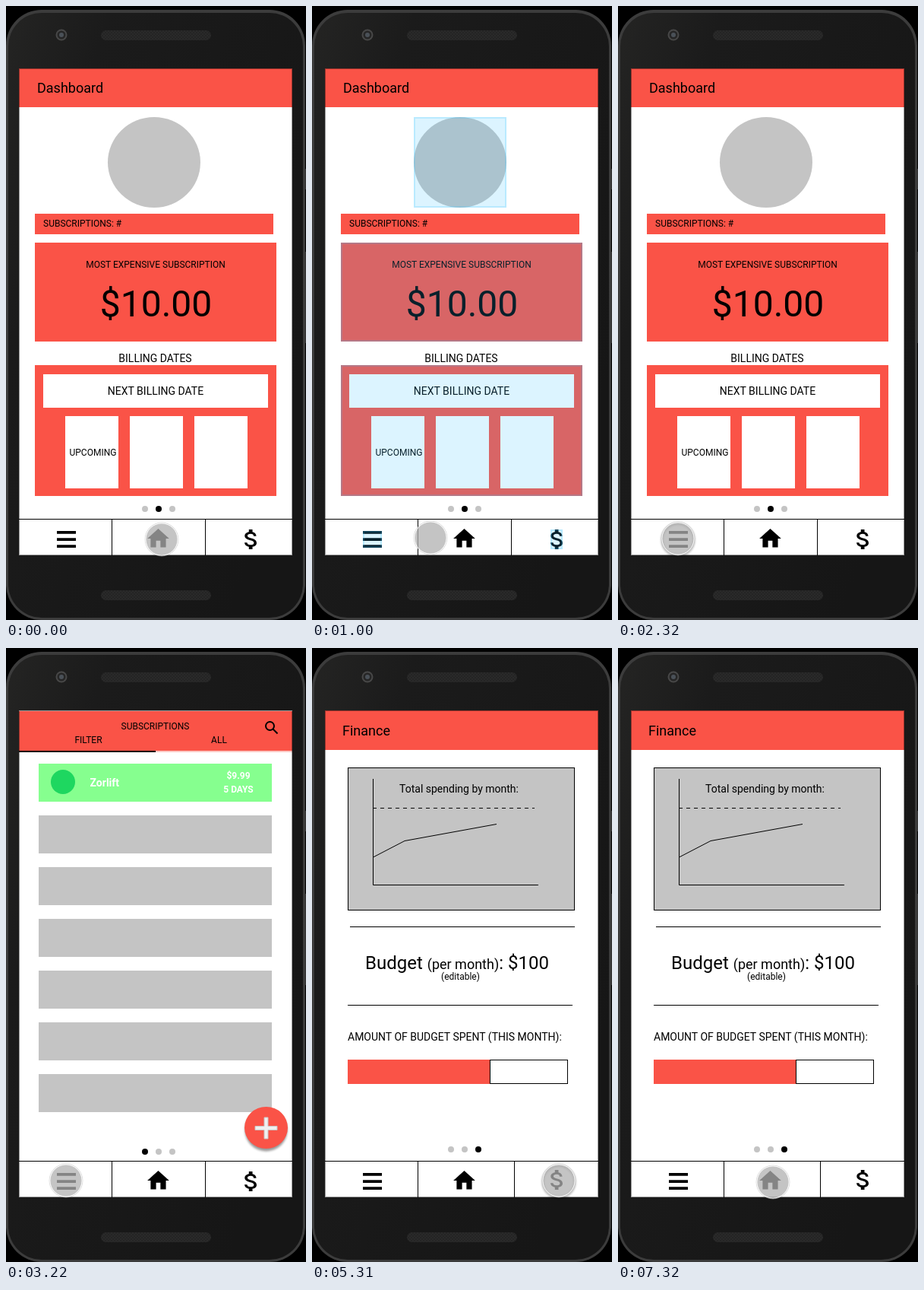
Recreate the animation shown at these times as an HTML page. Size 395x807 px, loop 8 s.

```html
<!DOCTYPE html>
<html lang="en">
<head>
<meta charset="utf-8">
<title>Phone prototype</title>
<style>
html, body { margin: 0; width: 100%; height: 100%; overflow: hidden; background: #000; }
svg { display: block; width: 395px; height: 807px; font: 12px Roboto, sans-serif; }
.red { fill: #fa5347; }
.gray { fill: #c4c4c4; }
.white { fill: #fff; }
.line { fill: none; stroke: #000; }
.mid { text-anchor: middle; }
.t14 { font-size: 14px; }
.t18 { font-size: 18px; }
.t24 { font-size: 24px; }
.bold { font-weight: 700; fill: #fff; }
#hints rect { fill: #32c1ff; fill-opacity: .35; }
#hints path { fill: none; stroke: #32c1ff; stroke-opacity: .55; stroke-width: 2; }
</style>
</head>
<body>
<svg viewBox="0 0 395 807">
  <defs>
    <linearGradient id="body" x2="1" y2=".6">
      <stop offset="0" stop-color="#242423"/><stop offset=".25" stop-color="#1b1b1b"/>
      <stop offset="1" stop-color="#161616"/>
    </linearGradient>
    <pattern id="mesh" width="4" height="4" patternUnits="userSpaceOnUse">
      <rect width="4" height="4" fill="#2a2a2a"/>
      <circle cx="1" cy="1" r=".8" fill="#1c1c1c"/><circle cx="3" cy="3" r=".8" fill="#1c1c1c"/>
    </pattern>
    <filter id="soft" x="-50%" y="-50%" width="200%" height="200%"><feGaussianBlur stdDeviation="1.5"/></filter>
  </defs>

  <!-- phone -->
  <path d="M392 214h3v27h-3zM392 323h3v120h-3z" fill="#333"/>
  <rect y="5" width="394" height="802" rx="47" fill="#3c3c3c"/>
  <rect x="3" y="9" width="388" height="795" rx="44" fill="url(#body)"/>
  <rect x="125" y="32" width="145" height="13" rx="6.5" fill="url(#mesh)"/>
  <rect x="125" y="768" width="145" height="13" rx="6.5" fill="url(#mesh)"/>
  <circle cx="73" cy="38" r="7.5" fill="#484848"/>
  <circle cx="73" cy="38" r="5.5" fill="#262626"/>
  <circle cx="73" cy="38" r="3" fill="#4a5158"/>
  <rect class="white" x="17" y="82" width="360" height="640"/>

  <g class="screen">
    <rect class="red" x="17" y="82" width="360" height="51"/>
    <text class="t18" x="41" y="114">Dashboard</text>
    <ellipse class="gray" cx="195" cy="205.5" rx="61" ry="59.5"/>
    <path class="red" d="M38 273h314v27H38zM38 311h318v130H38zM38 472h318v172H38z"/>
    <path class="white" d="M49 484h296v44H49zM78 539h70v95H78zM163 539h70v95h-70zM248 539h70v95h-70z"/>
    <text x="49" y="290">SUBSCRIPTIONS: #</text>
    <text class="mid" x="197" y="344">MOST EXPENSIVE SUBSCRIPTION</text>
    <text class="mid" x="197.5" y="408" font-size="48">$10.00</text>
    <text class="mid t14" x="196.5" y="468">BILLING DATES</text>
    <text class="mid t14" x="197" y="511">NEXT BILLING DATE</text>
    <text x="83.5" y="591">UPCOMING</text>
  </g>

  <g class="screen">
    <rect class="red" x="17" y="83" width="360" height="53"/>
    <rect x="17" y="135" width="180" height="2"/>
    <rect x="197" y="135" width="180" height="2" fill="#fcc8c4"/>
    <text class="mid" x="196.5" y="107">SUBSCRIPTIONS</text>
    <text class="mid" x="108.5" y="125">FILTER</text>
    <text class="mid" x="280.5" y="125">ALL</text>
    <g fill="none" stroke="#000" stroke-width="2">
      <circle cx="347.5" cy="102.5" r="5.5"/><path d="M351.5 106.5l6 6"/>
    </g>
    <rect x="43" y="152" width="307" height="50" fill="#86ff8f"/>
    <circle cx="75" cy="176" r="16" fill="#1ed760"/>
    <text class="bold t14" x="110.5" y="182">Zorlift</text>
    <text class="bold mid" x="306" y="172">$9.99</text>
    <text class="bold mid" x="306" y="190">5 DAYS</text>
    <g id="rows" class="gray"></g>
    <circle cx="342.5" cy="633.5" r="28" opacity=".4" filter="url(#soft)"/>
    <ellipse class="red" cx="342.5" cy="630.5" rx="28.5" ry="27.5"/>
    <path d="M340 617h5v11.5h12v5h-12V645h-5v-11.5h-12v-5h12z" fill="#f0f0f0" stroke="#c9c2c1"/>
  </g>

  <g class="screen">
    <rect class="red" x="17" y="82" width="360" height="52"/>
    <text class="t18" x="40" y="115">Finance</text>
    <rect class="gray" x="47.5" y="157.5" width="298" height="187" stroke="#000"/>
    <text class="mid t14" x="193.5" y="190">Total spending by month:</text>
    <path class="line" d="M80.5 172v139.5H298M80.5 275L122 253.5 243 231.5M50 366.5h296M47 469.5h296"/>
    <path class="line" d="M80 210.5h213" stroke-dasharray="5 5"/>
    <text class="t24" x="70" y="422">Budget <tspan class="t18">(per month)</tspan>: $100</text>
    <text class="mid" x="195.5" y="436">(editable)</text>
    <text class="t14" x="47" y="516">AMOUNT OF BUDGET SPENT (THIS MONTH):</text>
    <rect class="red" x="47" y="541" width="187" height="32"/>
    <rect class="line" x="234.5" y="541.5" width="102" height="31"/>
  </g>

  <!-- page dots and navigation -->
  <g id="dots"></g>
  <path class="line" d="M17 674.5h360M139.5 675v47"/>
  <path id="divider" class="line" d="M0 675v47"/>
  <path d="M67 690h25v3.7H67zM67 699.2h25v3.7H67zM67 708.3h25v3.7H67z"/>
  <path transform="translate(183.2 682.6) scale(1.44)" d="M10 20v-6h4v6h5v-8h3L12 3 2 12h3v8z"/>
  <path id="dollar" d="M11.8 10.9c-2.27-.59-3-1.2-3-2.15 0-1.09 1.01-1.85 2.7-1.85 1.78 0 2.44.85 2.5 2.1h2.21c-.07-1.72-1.12-3.3-3.21-3.81V3h-3v2.16c-1.94.42-3.5 1.68-3.5 3.61 0 2.31 1.91 3.46 4.7 4.13 2.5.6 3 1.48 3 2.41 0 .69-.49 1.79-2.7 1.79-2.06 0-2.87-.92-2.98-2.1h-2.2c.12 2.19 1.76 3.42 3.68 3.83V21h3v-2.15c1.95-.37 3.5-1.5 3.5-3.55 0-2.84-2.43-3.81-4.7-4.4z"/>
  <rect class="line" x="17.5" y="82.5" width="359" height="639" opacity=".4"/>

  <g id="hints"></g>

  <g id="cursor">
    <circle id="shadow" cy="1.5" r="21" fill="none" stroke="#000" stroke-width="2" opacity=".45" filter="url(#soft)"/>
    <circle r="21.2" fill="#b1b1b1" fill-opacity=".75"/>
    <circle r="21.9" fill="none" stroke="#bbb" stroke-width=".6"/>
    <circle r="21.1" fill="none" stroke="#fff"/>
  </g>
</svg>
<script>
const LOOP = 8000;
const STEP = 135; // the cursor and the hints move at a low frame rate
const $ = id => document.getElementById(id);
const screens = document.querySelectorAll('.screen');

const PAGES = [
  { from: 0, active: 1, dotY: 661, divider: 262.5, dollarY: 683.7 },
  { from: 2440, active: 0, dotY: 662, divider: 262.5, dollarY: 683.7 },
  { from: 5310, active: 2, dotY: 659, divider: 266.5, dollarY: 681.7 }
];
const MOVES = [
  { from: 0, to: 600, x: 199, y: 699 },
  { from: 810, to: 2400, x: 79, y: 700 },
  { from: 3345, to: 4800, x: 327, y: 698 },
  { from: 4800, to: 5100, x: 325, y: 700 },
  { from: 6440, to: 7840, x: 203, y: 702 }
];
const PRESSES = [[300, 1000], [2320, 3220], [5190, 6300]];

const clamp = v => Math.min(1, Math.max(0, v));
const easeOut = p => 1 - (1 - p) ** 5;

function cursorAt(t) {
  let x = 205, y = 701;
  for (const m of MOVES) {
    const e = easeOut(clamp((t - m.from) / (m.to - m.from)));
    x += (m.x - x) * e;
    y += (m.y - y) * e;
  }
  return [x, y];
}

// Quick rise, slower fade.
const hintAt = t => clamp(Math.min((t - 450) / 150, (1200 - t) / 530));

const hotspots = [[134, 146, 122, 119], [38, 311, 318, 130], [38, 472, 318, 172], [67, 690, 25, 22], [314, 688, 16, 26]];
$('hints').innerHTML = hotspots.map(([x, y, w, h]) =>
  `<rect x="${x}" y="${y}" width="${w}" height="${h}"/><path d="M${x + 1} ${y + 1}h${w - 2}v${h - 2}h${2 - w}z"/>`).join('');
$('rows').innerHTML = [0, 1, 2, 3, 4, 5].map(i =>
  `<rect x="43" y="${220 + 68 * i}" width="307" height="50"/>`).join('');
$('dots').innerHTML = [183, 201, 219].map(x => `<circle cx="${x}" r="4"/>`).join('');

function draw(t) {
  const page = PAGES.findLast(p => p.from <= t);
  screens.forEach((s, i) => s.style.display = PAGES[i] === page ? '' : 'none');
  [...$('dots').children].forEach((dot, i) => {
    dot.setAttribute('cy', page.dotY);
    dot.setAttribute('fill', i === page.active ? '#000' : '#c4c4c4');
  });
  $('divider').setAttribute('transform', `translate(${page.divider} 0)`);
  $('dollar').setAttribute('transform', `translate(304.1 ${page.dollarY}) scale(1.57 1.44)`);

  const held = Math.floor(t / STEP) * STEP;
  $('hints').style.opacity = hintAt(held);
  $('cursor').setAttribute('transform', `translate(${cursorAt(held).map(Math.round)})`);
  $('shadow').style.display = PRESSES.some(([a, b]) => a <= t && t < b) ? '' : 'none';
}

const start = performance.now();
function tick() {
  draw((performance.now() - start) % LOOP);
  requestAnimationFrame(tick);
}
tick();
</script>
</body>
</html>
```
